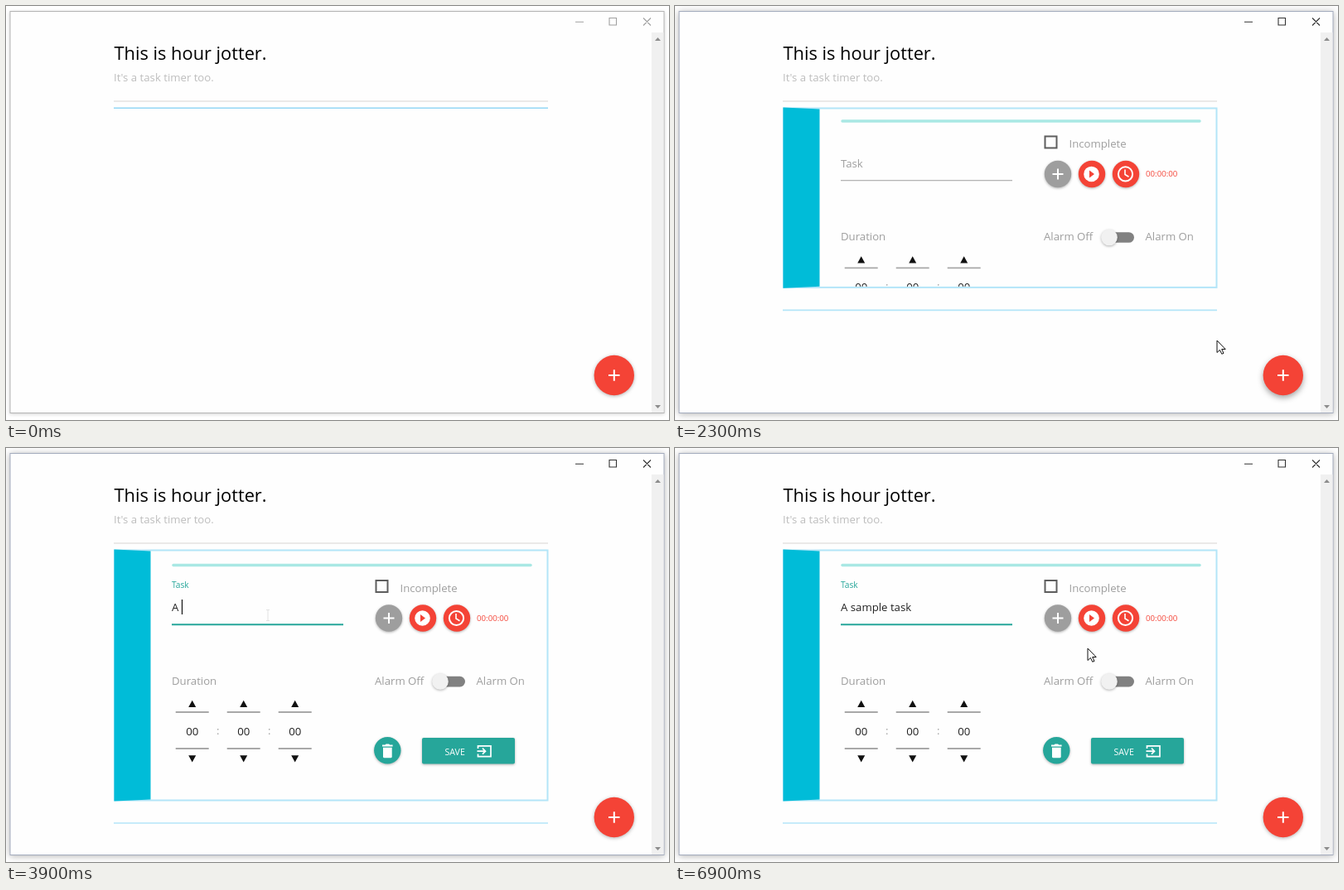
Recreate the animation shown at these times as an HTML page. Size 800 by 500 pixels, loop 7000 ms.

```html
<!DOCTYPE html>
<html lang="en">
<head>
<meta charset="utf-8">
<title>Task list</title>
<style>
html, body { margin: 0; width: 100%; height: 100%; overflow: hidden; background: #fff; }
svg { display: block; }
text { font: 13.2px "Open Sans", "Noto Sans", sans-serif; fill: #9e9e9e; }
.dark { fill: #212121; }
.lift { filter: drop-shadow(0 1.5px 1.5px rgba(0,0,0,.3)); }
.fab { filter: drop-shadow(0 1.5px 2px rgba(0,0,0,.3)); }
.fab.hot { filter: drop-shadow(0 3px 3.5px rgba(0,0,0,.36)); }
#win { stroke: #b4b4b4; filter: drop-shadow(0 1px 2px rgba(0,0,0,.18)); }
#buttons { stroke: #a0a0a0; }
.active #win { stroke: #a3abbd; filter: drop-shadow(0 1px 4px rgba(0,0,0,.3)); }
.active #buttons { stroke: #333; }
.icon { fill: none; stroke: #fff; stroke-width: 2; }
</style>
</head>
<body>
<svg id="stage" width="800" height="500">
  <defs><clipPath id="clip"><rect id="clipBox" x="130" y="122" width="525" height="0"/></clipPath></defs>

  <rect id="win" x="5" y="6.5" width="789" height="485" fill="#fefefe"/>
  <rect x="779" y="32" width="14.5" height="459" fill="#f0f0f0"/>
  <path d="M783 42l3.5-4 3.5 4zM783 482l3.5 4 3.5-4z" fill="#8c8c8c"/>
  <path id="buttons" d="M687 19.2h10M728 14.5h8.5v8.5h-8.5zM769 14.5l9 9m0-9l-9 9" fill="none" stroke-width="1.1"/>

  <text x="130.5" y="65" style="font-size:21.8px;fill:#000">This is hour jotter.</text>
  <text x="130" y="91" style="fill:#bdbdbd">It's a task timer too.</text>
  <path d="M130 115h524" stroke="#e4e2e0" stroke-width="1.5"/>
  <path id="rule" stroke-width="1.6"/>

  <g id="panel">
    <rect id="frame" x="131" y="123.5" width="522.5" fill="#fefefe" stroke="#b3e5f8" stroke-width="2"/>
    <polygon id="strip" fill="#00bcd8"/>
    <g clip-path="url(#clip)"><g id="form">
      <path d="M202 141.5h431" stroke="#a9e8e4" stroke-width="3.5" stroke-linecap="round"/>
      <text id="label" x="200">Task</text>
      <path id="line" d="M200 213.3h207"/>
      <text id="typed" class="dark" x="200" y="197"></text>
      <path id="caret" stroke="#111" stroke-width="1.2"/>

      <rect x="446.5" y="160" width="14" height="14" fill="none" stroke="#5e5e5e" stroke-width="2"/>
      <text x="475.5" y="174">Incomplete</text>
      <g class="lift">
        <circle cx="462" cy="205.5" r="16.2" fill="#9e9e9e"/>
        <circle cx="503" cy="205.5" r="16.2" fill="#f44336"/>
        <circle cx="544" cy="205.5" r="16.2" fill="#f44336"/>
      </g>
      <path class="icon" d="M455.5 205.5h13M462 199v13"/>
      <circle cx="502.5" cy="205.5" r="9.3" fill="#fff"/>
      <path d="M500 201l6 4.5-6 4.5z" fill="#f44336"/>
      <circle class="icon" cx="543.5" cy="205.5" r="8.6"/>
      <path class="icon" d="M543 200v6l4.5 2.8" style="stroke-width:1.6"/>
      <text x="568" y="209" style="font-size:9.7px;fill:#f44336">00:00:00</text>

      <text x="200" y="285.5">Duration</text>
      <g id="spinners"></g>

      <text x="445" y="285.5">Alarm Off</text>
      <rect x="516" y="275.8" width="38" height="12.6" rx="6.3" fill="#818181"/>
      <circle class="lift" cx="524" cy="282" r="9.8" fill="#f1f1f1"/>
      <text x="567.5" y="285.5">Alarm On</text>

      <g class="lift" fill="#26a69a">
        <circle cx="460.3" cy="365.3" r="16.2"/>
        <rect x="502" y="350" width="112" height="31.5" rx="2"/>
      </g>
      <path d="M454 358.5h3.5l1-1h3.600l1 1h3.500v2H454zM455 361.700h10.700v11q0 1.500-1.500 1.500h-7.700q-1.500 0-1.500-1.500z" fill="#fff"/>
      <text x="529.5" y="370.5" style="font-size:10.6px;fill:#fff">SAVE</text>
      <path class="icon" d="M569.500 363v-3.200h15.500v12.800h-15.500v-3.200M568.500 366.200h9.500M575 362.700l3.500 3.500-3.500 3.500" style="stroke-width:1.700"/>
    </g></g>
  </g>

  <g id="fab" class="fab"><circle cx="733.8" cy="446" r="24.2" fill="#f44336"/></g>
  <path class="icon" d="M727 446h13.500M733.800 439.300v13.500"/>

  <g id="pointer" fill="#fff" stroke="#111" stroke-linejoin="round">
    <path id="arrow" d="M0 0V14.500L3.400 11.400 5.800 16.300 8 15.300 5.700 10.500H10.200Z"/>
    <path id="hand" d="M-1.500 10.500V1.500q1.500-2.500 3 0v5.500q1.500-1 2.800.5 1.500-.8 2.700.700 1.500-.3 2 1.300v4l-1.800 5.500H0L-5.500 11q.5-2 2-1.200z"/>
    <path id="beam" d="M-2-6.500h4M0-6.500v13M-2 6.500h4" stroke="#e2e2e2"/>
  </g>
</svg>
<script>
const $ = id => document.getElementById(id);
const set = (id, attrs) => { for (const k in attrs) $(id).setAttribute(k, attrs[k]); };
const show = (id, on) => { $(id).style.display = on ? "" : "none"; };
const clamp = p => Math.max(0, Math.min(1, p));
const mix = (a, b, p) => a + (b - a) * p;

const LOOP = 7000, STEP = 100;
const CLICK = 1900, OPEN = 2043, FOCUS = 2700;
const PHRASE = "A sample task";
const KEYS = [3800, 3900, 4000, 4100, 4200, 4300, 4500, 4600, 4600, 4800, 4900, 5000, 5000];
// time, x, y of the pointer tip
const PATH = [
  [100, 794, 470], [400, 690, 345], [700, 555, 225], [900, 508, 188],
  [1100, 400, 134], [1200, 352, 150], [1400, 500, 275], [1600, 677, 399],
  [1800, 737, 433], [2100, 737, 433], [2300, 654, 404], [2500, 440, 275],
  [2700, 316, 202], [5800, 316, 202], [6100, 380, 226], [6400, 515, 290],
  [6500, 523, 294], [6600, 517, 288], [6900, 498, 242], [7000, 498, 242]
];

$("spinners").innerHTML = [224.7, 286.7, 348.7].map((x, i) => `
  <path d="M${x - 4.5} 313l4.500-8.300 4.500 8.300zM${x - 4.5} 371.300l4.500 8.300 4.500-8.300z" fill="#111"/>
  <path d="M${x - 20} 319h40M${x - 20} 363h40" stroke="#a8a8a8" stroke-width="1.8"/>
  <text class="dark" x="${x}" y="346.500" text-anchor="middle">00</text>
  ${i < 2 ? `<text x="${x + 31}" y="346" text-anchor="middle">:</text>` : ""}`).join("");

function pointerAt(t) {
  const i = PATH.findIndex(k => k[0] > t), a = PATH[i - 1], b = PATH[i];
  const p = (t - a[0]) / (b[0] - a[0]);
  return [mix(a[1], b[1], p), mix(a[2], b[2], p)];
}

function drawPointer(t) {
  show("pointer", t >= PATH[0][0]);
  if (t < PATH[0][0]) return;
  const [x, y] = pointerAt(t);
  const onFab = Math.hypot(x - 734, y - 446) < 24;
  const onField = t >= FOCUS && x > 200 && x < 407 && y > 180 && y < 214;
  set("pointer", { transform: `translate(${x} ${y})` });
  show("hand", onFab);
  show("beam", onField);
  show("arrow", !onFab && !onField);
}

function drawPanel(t) {
  const open = t >= OPEN;
  const e = 0.5 - Math.cos(Math.PI * clamp((t - OPEN) / 400)) / 2;
  const h = 302 * e, bottom = 123.5 + h;
  const ruleY = open ? bottom + 27.5 : 123.2;
  show("panel", open);
  set("rule", { d: `M130 ${ruleY}h524`, stroke: open ? "#b3e5f8" : "#93d7f6" });
  set("frame", { height: h });
  set("clipBox", { height: Math.max(0, h + 0.5) });
  set("strip", { points: `130.5,122.5 174.5,124.5 174.5,${bottom - 1} 130.5,${bottom + 1}` });
  set("form", { transform: `translate(0 ${-9 * (1 - e)})` });
}

function drawField(t) {
  const focused = t >= FOCUS, p = clamp((t - FOCUS) / 200);
  set("label", { y: mix(198, 168.5, p) });
  $("label").style.fontSize = mix(13.2, 10.2, p) + "px";
  $("label").style.fill = focused ? "#26a69a" : "";
  set("line", { stroke: focused ? "#26a69a" : "#9e9e9e", "stroke-width": focused ? 2 : 1 });

  const count = KEYS.filter(k => k <= t).length;
  const typed = PHRASE.slice(0, count);
  if ($("typed").textContent !== typed) $("typed").textContent = typed;
  // a no-break space keeps the trailing blank measurable
  let x = 201;
  if (count) {
    $("typed").textContent = typed.replace(/ $/, "\u00a0");
    x = 200.7 + $("typed").getComputedTextLength();
  }
  const blink = count ? (t - KEYS[count - 1]) % 1000 < 500 : t < FOCUS + 500;
  show("caret", focused && blink);
  set("caret", { d: `M${x} 183v18` });
}

function frame(now) {
  const t = Math.floor(now % LOOP / STEP) * STEP;
  $("stage").classList.toggle("active", t >= CLICK);
  $("fab").classList.toggle("hot", t >= 1800 && t < 2600);
  drawPanel(t);
  drawField(t);
  drawPointer(t);
}

const start = performance.now();
(function tick() {
  frame(performance.now() - start);
  requestAnimationFrame(tick);
})();
</script>
</body>
</html>
```
